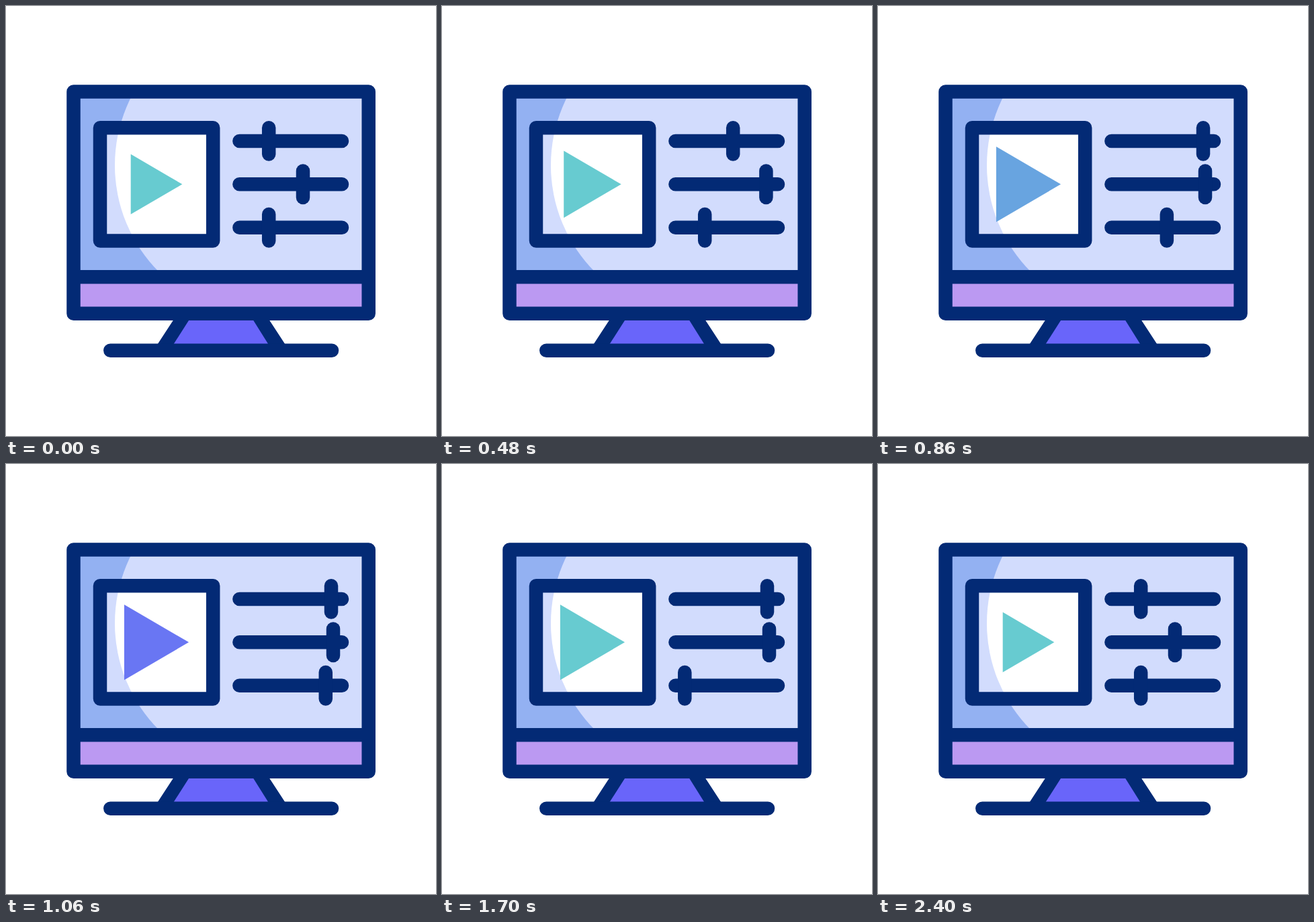
An HTML page for the animation above (2820 ms loop, 640 px wide and 640 px high).

```html
<!DOCTYPE html>
<html>
<head>
<meta charset="utf-8">
<style>
  html, body { margin: 0; width: 100%; height: 100%; overflow: hidden; background: #fff; }
  svg { display: block; width: 100vw; height: 100vh; }
  .line { fill: none; stroke: #032a75; stroke-width: 20.5; stroke-linecap: round; stroke-linejoin: round; }
</style>
</head>
<body>
<svg viewBox="0 0 640 640">
  <defs>
    <clipPath id="screen"><path d="M105 132H535V403H105Z"/></clipPath>
    <clipPath id="player"><path d="M140 181H308V349H140Z"/></clipPath>
  </defs>

  <path fill="#6965fa" d="M260 466H380L404 508H236Z"/>
  <path fill="#032a75" d="M250 466H273.3L249.3 503.5H225.5ZM391 466H367L390.5 503.5H415.5Z"/>
  <path class="line" d="M155.3 512.7H485"/>

  <path fill="#bb99f2" d="M105 403H535V453H105Z"/>
  <g clip-path="url(#screen)">
    <path fill="#93b1f2" d="M105 132H535V403H105Z"/>
    <circle cx="387" cy="237" r="225" fill="#d2dcfd"/>
  </g>
  <g clip-path="url(#player)">
    <path fill="#d2dcfd" d="M140 181H308V349H140Z"/>
    <circle cx="387" cy="237" r="225" fill="#fff"/>
  </g>
  <path id="play" d="M-38.3 -44.7L38.3 0L-38.3 44.7Z"/>

  <path class="line" d="M100.5 127.5H539.7V457.8H100.5ZM100.5 403.2H539.7"/>
  <path class="line" d="M140 181.2H308.2V349.4H140Z"/>
  <path class="line" d="M347.4 201H500M347.4 265.3H500M347.4 329.7H500"/>
  <path class="line knob" d="M0 181.2V220.6"/>
  <path class="line knob" d="M0 245.6V285"/>
  <path class="line knob" d="M0 310V349.4"/>
</svg>
<script>
const LOOP = 2820;
const play = document.getElementById('play');
const knobs = document.querySelectorAll('.knob');

// Each track is a list of [time, value] keys, eased between neighbours.
const knobTracks = [
  [[200, 391.2], [800, 484], [2000, 484], [2300, 391.2]],
  [[0, 442], [600, 487], [2000, 487], [2400, 442]],
  [[600, 391.2], [1220, 492.3], [1680, 361], [2040, 391.2]]
];
const scaleTrack = [[200, 1], [800, 1.255], [2000, 1.255], [2400, 1]];
const tintTrack = [[600, 0], [1220, 1], [1680, 0]];
const teal = [103, 203, 208], violet = [105, 101, 250];

function valueAt(track, t) {
  let [t0, v0] = track[0];
  if (t <= t0) return v0;
  for (const [t1, v1] of track) {
    if (t < t1) {
      const p = (t - t0) / (t1 - t0);
      return v0 + (v1 - v0) * p * p * (3 - 2 * p);
    }
    [t0, v0] = [t1, v1];
  }
  return v0;
}

function draw() {
  const t = performance.now() % LOOP;
  knobs.forEach((knob, i) =>
    knob.setAttribute('transform', `translate(${valueAt(knobTracks[i], t)})`));
  play.setAttribute('transform', `translate(224 265.3) scale(${valueAt(scaleTrack, t)})`);
  const tint = valueAt(tintTrack, t);
  play.setAttribute('fill', `rgb(${teal.map((c, i) => Math.round(c + (violet[i] - c) * tint))})`);
  requestAnimationFrame(draw);
}
draw();
</script>
</body>
</html>
```
